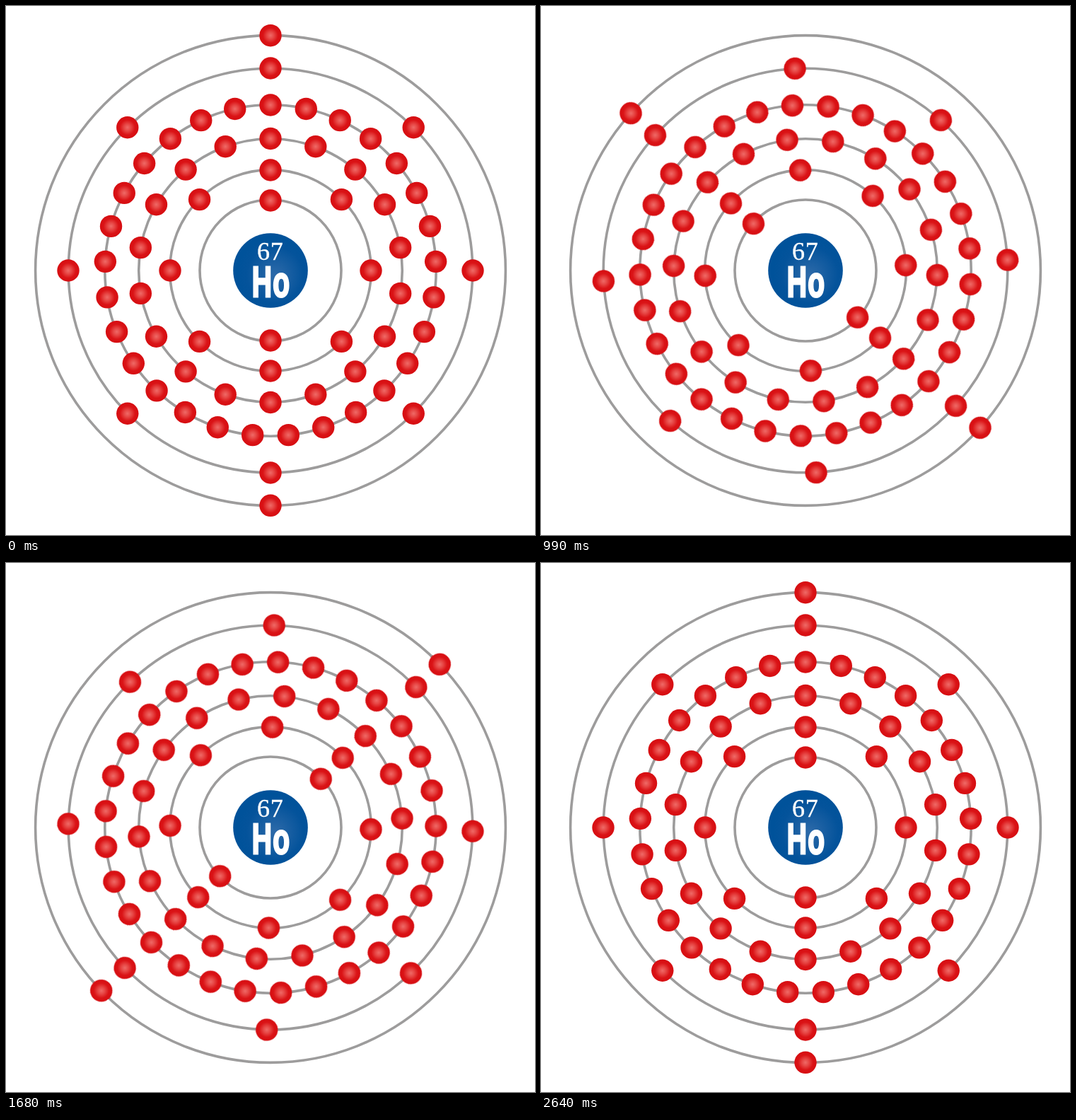
Recreate the animation shown at these times as an HTML page. Size 748 by 748 pixels, loop 2670 ms.

```html
<!DOCTYPE html>
<html lang="en">
<head>
<meta charset="utf-8">
<title>Electron shells</title>
<style>
  html, body { margin: 0; width: 100%; height: 100%; overflow: hidden; background: #fff; }
  svg { display: block; width: 100vw; height: 100vh; }
  #electrons { transform-origin: 374px 374px; }
  .number { font: 36px "Liberation Serif", "Times New Roman", serif; letter-spacing: .8px; stroke: #fff; stroke-width: .4; }
  .symbol { font: bold 62px "Liberation Sans", Arial, sans-serif; letter-spacing: 2px; stroke: #fff; stroke-width: 3; }
</style>
</head>
<body>
<svg viewBox="0 0 748 748">
  <defs>
    <radialGradient id="red">
      <stop offset="0" stop-color="#ef6a67"/>
      <stop offset=".3" stop-color="#e74846"/>
      <stop offset=".68" stop-color="#da1316"/>
      <stop offset="1" stop-color="#d60d11"/>
    </radialGradient>
    <radialGradient id="blue" cx=".56" cy=".56" r=".5">
      <stop offset="0" stop-color="#2d6aa9"/>
      <stop offset=".75" stop-color="#04539b"/>
      <stop offset="1" stop-color="#00529a"/>
    </radialGradient>
    <circle id="electron" r="15.7" fill="url(#red)"/>
  </defs>
  <g id="rings" fill="none" stroke="#9d9c9c" stroke-width="3.6"></g>
  <circle cx="374" cy="374" r="52.8" fill="url(#blue)"/>
  <g fill="#fff">
    <text class="number" x="355" y="359">67</text>
    <text class="symbol" transform="translate(347.7 410.7) scale(.63 1)">Ho</text>
  </g>
  <g id="electrons"></g>
</svg>
<script>
  const CENTER = 374;
  const STEP = 30;
  const LOOP = 89 * STEP;

  // [ring radius, electron orbit radius, electron count]
  const shells = [
    [100, 99, 2], [142.4, 142, 8], [186.3, 186.5, 18],
    [234.2, 234, 29], [285.8, 286, 8], [332.4, 332.3, 2]
  ];

  const rings = document.getElementById("rings");
  const electrons = document.getElementById("electrons");

  function add(parent, tag, attrs) {
    const el = document.createElementNS("http://www.w3.org/2000/svg", tag);
    for (const key in attrs) el.setAttribute(key, attrs[key]);
    parent.append(el);
  }

  for (const [ring, orbit, count] of shells) {
    add(rings, "circle", { cx: CENTER, cy: CENTER, r: ring });
    for (let i = 0; i < count; i++) {
      const a = i / count * 2 * Math.PI;
      add(electrons, "use", {
        href: "#electron",
        x: CENTER + orbit * Math.sin(a),
        y: CENTER - orbit * Math.cos(a)
      });
    }
  }

  // Two half turns of 45 and 43 steps, then one step at rest.
  electrons.animate([
    { offset: 0, transform: "rotate(0deg)", easing: "steps(45)" },
    { offset: 45 / 89, transform: "rotate(180deg)", easing: "steps(43)" },
    { offset: 88 / 89, transform: "rotate(360deg)" },
    { offset: 1, transform: "rotate(360deg)" }
  ], { duration: LOOP, delay: -1, iterations: Infinity });
</script>
</body>
</html>
```
